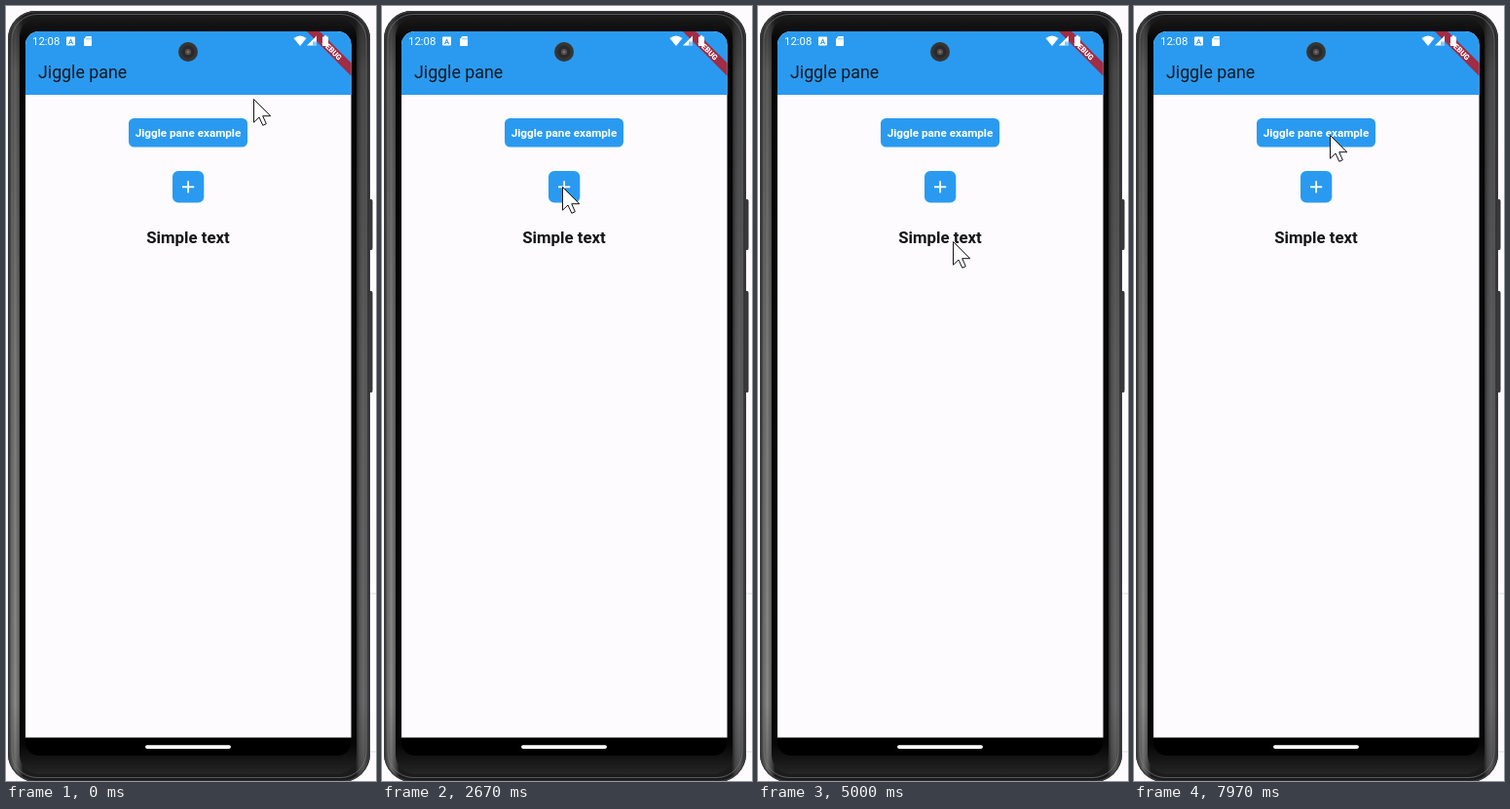
These frames come from a looping animation (380x794 px, 8 s). An HTML page:

```html
<!DOCTYPE html>
<html lang="en">
<head>
<meta charset="utf-8">
<title>Phone demo</title>
<style>
  html, body { margin: 0; width: 100%; height: 100%; overflow: hidden; background: #fdfbfe; }
  svg { display: block; width: 100vw; height: 100vh; font-family: Roboto, sans-serif; }
</style>
</head>
<body>
<svg viewBox="0 0 380 794">
  <defs>
    <linearGradient id="metal" x1="2" x2="374" y1="0" y2="0" gradientUnits="userSpaceOnUse">
      <stop offset="0" stop-color="#2b2b2d"/>
      <stop offset=".008" stop-color="#5c5c5e"/>
      <stop offset=".02" stop-color="#8a8a88"/>
      <stop offset=".03" stop-color="#646465"/>
      <stop offset=".042" stop-color="#1c1c1d"/>
      <stop offset=".96" stop-color="#1c1c1d"/>
      <stop offset=".97" stop-color="#555557"/>
      <stop offset=".982" stop-color="#6b6b6c"/>
      <stop offset=".992" stop-color="#464648"/>
      <stop offset="1" stop-color="#252527"/>
    </linearGradient>
    <linearGradient id="shade" x1="0" x2="0" y1="5" y2="794" gradientUnits="userSpaceOnUse">
      <stop offset="0" stop-color="#1a1a1b" stop-opacity=".75"/>
      <stop offset=".08" stop-color="#1a1a1b" stop-opacity=".4"/>
      <stop offset=".45" stop-color="#1a1a1b" stop-opacity=".15"/>
      <stop offset=".9" stop-color="#1a1a1b" stop-opacity="0"/>
      <stop offset="1" stop-color="#1a1a1b" stop-opacity=".35"/>
    </linearGradient>
    <linearGradient id="bezel" x1="0" x2="0" y1="12" y2="787" gradientUnits="userSpaceOnUse">
      <stop offset="0" stop-color="#19191a"/>
      <stop offset=".03" stop-color="#060606"/>
      <stop offset=".96" stop-color="#060606"/>
      <stop offset="1" stop-color="#252526"/>
    </linearGradient>
    <clipPath id="screen"><rect x="20" y="26" width="334.5" height="742" rx="14"/></clipPath>
  </defs>

  <rect width="380" height="794" fill="#fdfbfe"/>
  <rect x="366" y="602" width="30" height="162" rx="7" fill="none" stroke="#dcdcdc"/>

  <g id="phone">
    <path d="M372 198h3q1.500 0 1.500 2v48q0 2-1.500 2h-3zM372 292h3q1.500 0 1.500 2v100q0 2-1.500 2h-3z" fill="#353537"/>
    <rect x="2" y="5" width="372" height="790" rx="29" fill="url(#metal)"/>
    <rect x="2" y="5" width="372" height="790" rx="29" fill="url(#shade)"/>
    <rect x="2.700" y="5.700" width="370.600" height="788.600" rx="28" fill="none" stroke="#3a3a3c" stroke-width="1.400"/>
    <rect x="6" y="8.500" width="364" height="782" rx="26" fill="none" stroke="#7b7b7c" stroke-opacity=".65"/>
    <rect x="14" y="12" width="346" height="775" rx="20" fill="url(#bezel)"/>
  </g>

  <g clip-path="url(#screen)">
    <rect x="20" y="26" width="335" height="742" fill="#000"/>
    <rect x="20" y="26" width="335" height="723.500" fill="#fdfbfe"/>
    <rect x="20" y="26" width="335" height="65" fill="#2a9af0"/>
    <text x="33" y="74" font-size="17.800" fill="#10181f">Jiggle pane</text>
    <g transform="translate(334.800 45.300) rotate(45)">
      <rect x="-40" y="-4.700" width="80" height="9.400" fill="#a02c45"/>
      <text y="2.800" font-size="7.800" font-weight="900" text-anchor="middle" fill="#fff">DEBUG</text>
    </g>

    <g id="status" fill="#fff">
      <text x="27" y="40" font-size="11.400">12:08</text>
      <rect x="62" y="31.500" width="9" height="9" rx="1"/>
      <text x="66.500" y="38.700" font-size="7.500" font-weight="700" text-anchor="middle" fill="#2a9af0">A</text>
      <path d="M82.500 31H87q1 0 1 1v8q0 1-1 1h-6q-1 0-1-1v-6z"/>
      <path d="M83 32.500v2M85 32.500v2M87 32.500v2" stroke="#2a9af0" stroke-width=".7"/>
      <path d="M295.500 33q6.500-5 13 0L302 41z"/>
      <path d="M309 40.500L319 30.500V40.500z"/>
      <path d="M315 36.500V40.500H319V36.500z" fill="#2a9af0" opacity=".55"/>
      <path d="M325 31.500h1.700v-1.200h2.600v1.200h1.700V41h-6z"/>
    </g>
  </g>

  <circle cx="187" cy="47" r="10" fill="#353536"/>
  <circle cx="187" cy="47" r="6.500" fill="#29292a"/>
  <circle cx="187" cy="47" r="3.200" fill="#4d4a4b"/>
  <circle cx="187" cy="47" r="1.500" fill="#777274"/>
  <rect x="143" y="757.300" width="88" height="3.600" rx="1.800" fill="#fff"/>

  <g id="button">
    <rect x="126" y="115" width="122" height="29.500" rx="5.500" fill="#2a9af0"/>
    <text x="187" y="134" font-size="11.700" font-weight="700" text-anchor="middle" fill="#fff">Jiggle pane example</text>
  </g>
  <g id="plus">
    <rect x="171" y="169" width="32.300" height="32.500" rx="6" fill="#2a9af0"/>
    <path d="M181 185.300h12.200M187.100 179.200v12.200" stroke="#fff" stroke-width="1.700"/>
  </g>
  <g id="label">
    <text x="187" y="243" font-size="16.800" font-weight="700" text-anchor="middle" fill="#141416">Simple text</text>
  </g>
  <path id="cursor" d="M.5 .5V24.200L6 19L9.800 27.300L13.300 25.700L9.700 17.700H17.800z" fill="#fff" stroke="#141416" stroke-linejoin="round"/>
</svg>

<script>
const LOOP = 8000;
const el = id => document.getElementById(id);

// Pointer stops: time, x, y
const path = [
  [0, 254, 95], [200, 254, 95], [1000, 163, 139], [1950, 163, 139],
  [2500, 185, 185], [3900, 185, 185], [4600, 200, 241],
  [6600, 200, 241], [7400, 201, 132], [LOOP, 201, 132]
];

// Pressable parts: centre y, press and release times
const parts = [
  { node: el('button'), y: 130, taps: [[1600, 1740]] },
  { node: el('plus'), y: 185.3, taps: [[2850, 3000]] },
  { node: el('label'), y: 237.5, taps: [[5150, 5300], [5900, 6080]] }
];

const smooth = p => p * p * (3 - 2 * p);

function pointer(t) {
  const i = path.findIndex(stop => t < stop[0]);
  const [t0, x0, y0] = path[i - 1], [t1, x1, y1] = path[i];
  const p = smooth((t - t0) / (t1 - t0));
  return [x0 + (x1 - x0) * p, y0 + (y1 - y0) * p];
}

// Shrinks while held, then settles with a damped spring
function dip(t, [down, up]) {
  if (t < down || t > up + 600) return 0;
  if (t < up) return 0.04 * smooth(Math.min(1, (t - down) / 100));
  const s = t - up;
  return 0.04 * Math.exp(-s / 110) * Math.cos(s / 55);
}

function draw(t) {
  const [x, y] = pointer(t);
  el('cursor').setAttribute('transform', `translate(${x} ${y})`);
  for (const { node, y: cy, taps } of parts) {
    const k = taps.reduce((scale, tap) => scale - dip(t, tap), 1);
    node.setAttribute('transform', `translate(187 ${cy}) scale(${k}) translate(-187 ${-cy})`);
  }
}

const start = performance.now();
function tick() {
  draw((performance.now() - start) % LOOP);
  requestAnimationFrame(tick);
}
tick();
</script>
</body>
</html>
```
